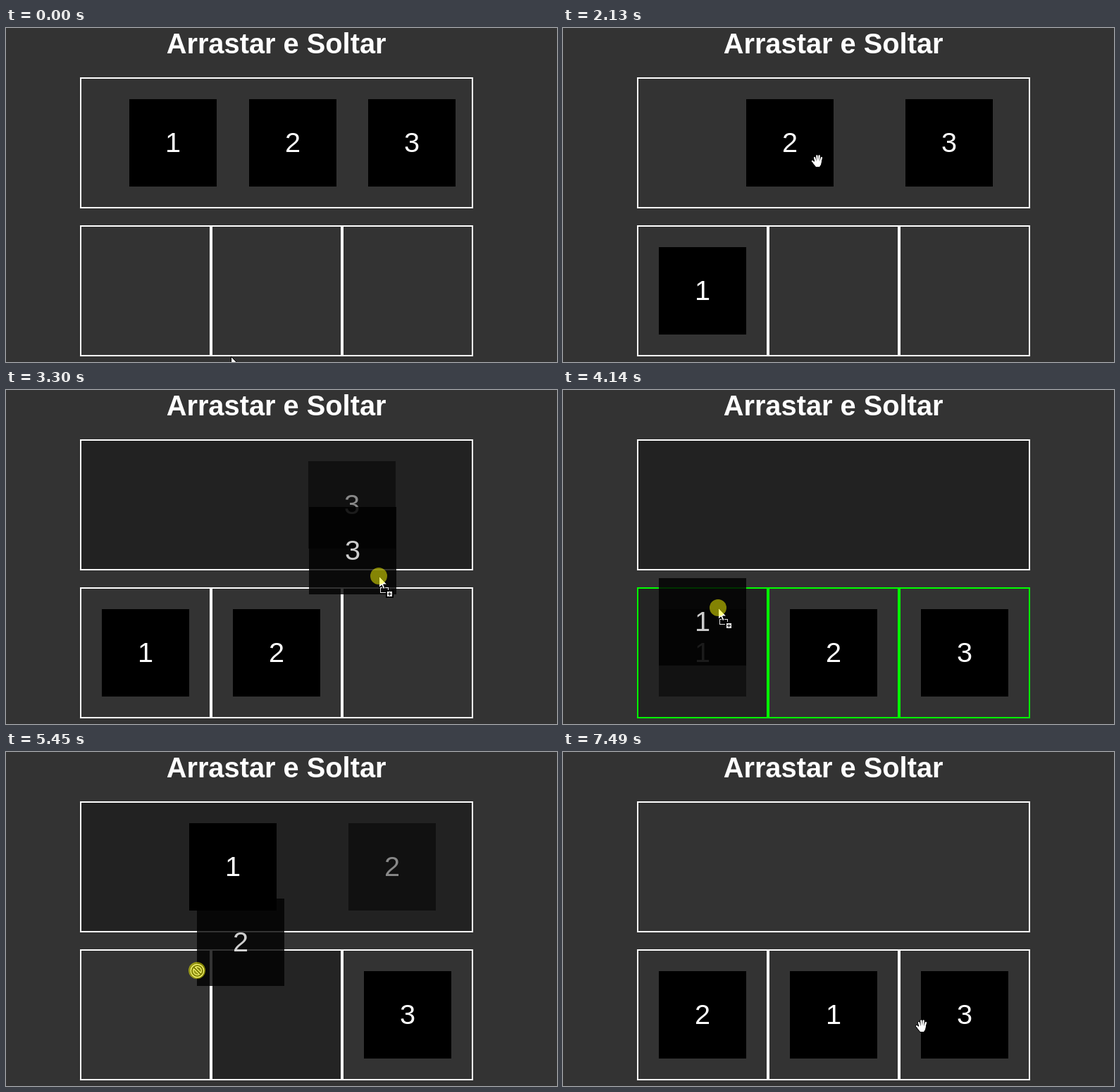
These frames come from a looping animation (782x474 px, 7820 ms). An HTML page with a canvas:

```html
<!DOCTYPE html>
<html lang="pt">
<head>
<meta charset="utf-8">
<title>Arrastar e Soltar</title>
<style>
  html, body { margin: 0; width: 100%; height: 100%; overflow: hidden; background: #333; }
  canvas { display: block; }
</style>
</head>
<body>
<canvas id="stage" width="782" height="474"></canvas>
<script>
const ctx = document.getElementById('stage').getContext('2d');
const LOOP = 7820, TILE = 124, SLOT = 186, LEFT = 105, INNER = 554;
const HOVER = 130; // pause over a tile before pressing
const LAG = 25;    // delay before the page reacts to the pointer
const FAMILY = '"Liberation Sans", Arial, sans-serif';

const point = (x, y) => ({ x, y });
const stop = (time, x, y) => ({ time, x, y });

// Tile and destination follow from where the pointer presses and releases.
const drags = [
  { press: stop(890, 245, 208), drop: stop(1710, 226, 365) },
  { press: stop(2260, 361, 189), drop: stop(2800, 415, 357) },
  { press: stop(3150, 528, 199), drop: stop(3500, 531, 362) },
  { press: stop(4030, 220, 353), drop: stop(4380, 220, 170) },
  { press: stop(4680, 385, 362), drop: stop(4930, 440, 190) },
  { press: stop(5114, 486, 203), drop: stop(5614, 200, 346) },
  { press: stop(6070, 444, 174), drop: stop(6535, 382, 378) }
];

const stops = [
  stop(0, 319, 466), stop(330, 482, 385),
  ...drags.flatMap(({ press, drop }) => [{ ...press, time: press.time - HOVER }, press, drop]),
  stop(6610, 462, 382), stop(6950, 566, 438), stop(7490, 509, 389), stop(LOOP, 509, 389)
];

function pointerAt(t) {
  const i = Math.max(1, stops.findIndex(s => s.time >= t));
  const a = stops[i - 1], b = stops[i];
  const k = (t - a.time) / (b.time - a.time), eased = k * k * (3 - 2 * k);
  return point(Math.round(a.x + (b.x - a.x) * eased), Math.round(a.y + (b.y - a.y) * eased));
}

// -1 is the upper box, 0 to 2 the slots, null outside
function zoneAt({ x, y }) {
  const offset = x - LEFT, inner = offset % SLOT;
  if (offset < 2 || offset > INNER + 2) return null;
  if (y > 71 && y < 254) return -1;
  return y > 281 && y < 464 && inner > 1 && inner < SLOT - 2 ? Math.floor(offset / SLOT) : null;
}

function layout(top, slots) {
  const spots = {}, gap = (INNER - TILE * top.length) / (top.length + 1);
  top.forEach((n, i) =>
    spots[n] = point(Math.round(LEFT + 1.9 + gap * 1.5 + i * (TILE + gap)), 101));
  slots.forEach((n, i) => { if (n) spots[n] = point(136 + SLOT * i, 311); });
  return { top, slots, spots, solved: slots.join() === '1,2,3' };
}

const within = (p, s) => p.x >= s.x && p.x < s.x + TILE && p.y >= s.y && p.y < s.y + TILE;
const tileUnder = (p, spots) => Object.keys(spots).find(n => within(p, spots[n]));

const layouts = [layout([1, 2, 3], [0, 0, 0])];
drags.forEach((drag, i) => {
  const { top, slots, spots } = layouts[i];
  const zone = zoneAt(drag.drop);
  drag.tile = Number(tileUnder(drag.press, spots));
  const newTop = top.filter(n => n !== drag.tile);
  const newSlots = slots.map(n => n === drag.tile ? 0 : n);
  if (zone < 0) newTop.push(drag.tile); else newSlots[zone] = drag.tile;
  layouts.push(layout(newTop, newSlots));
});

function visitedZones(drag, t) {
  const zones = new Set([-1]);
  for (let s = drag.press.time; s <= t - LAG; s += 10) zones.add(zoneAt(pointerAt(s)));
  return zones;
}

function rect(color, x, y, w, h) {
  ctx.fillStyle = color;
  ctx.fillRect(x, y, w, h);
}

function line(shape, color, width) {
  ctx.strokeStyle = color;
  ctx.lineWidth = width;
  ctx.stroke(shape);
}

function box(x, y, w, h, border, fill) {
  rect(border, x, y, w, h);
  rect(fill, x + 2, y + 2, w - 4, h - 4);
}

function drawTile(n, { x, y }, alpha = 1) {
  ctx.globalAlpha = alpha;
  rect('#000', x, y, TILE, TILE);
  ctx.fillStyle = '#fff';
  ctx.font = '39.68px ' + FAMILY;
  ctx.fillText(n, x + TILE / 2, y + 75);
  ctx.globalAlpha = 1;
}

const arrowShape = new Path2D('M.5.5V16.5L4.2 13L6.6 18.5L9 17.5L6.6 12H11.5Z');
const noEntry = new Path2D('M8 .5A7.5 7.5 0 1 1-7 .5A7.5 7.5 0 1 1 8 .5M-4.5-4.5L5.5 5.5');
const palm = new Path2D('M-4 0H6L5 5L3 8H-2L-6 3Z');
const fingers = new Path2D('M-7 0L-3 4');
for (let i = -1.5; i < 2; i++) {
  fingers.moveTo(1 + i * 3.3, -8 + i * i * 1.4);
  fingers.lineTo(1 + i * 2, 2);
}

function arrow() {
  ctx.fillStyle = '#fff';
  ctx.fill(arrowShape);
  line(arrowShape, '#000', 1);
}

function hand() {
  line(palm, '#000', 2);
  line(fingers, '#000', 4);
  line(fingers, '#fff', 2.3);
  ctx.fillStyle = '#fff';
  ctx.fill(palm);
}

function copyArrow() {
  ctx.strokeStyle = '#fff';
  ctx.lineWidth = 1;
  ctx.setLineDash([1, 1]);
  ctx.strokeRect(2.5, 16.5, 11, 7);
  ctx.setLineDash([]);
  arrow();
  box(10, 20, 11, 11, '#000', '#fff');
  rect('#000', 13, 25, 5, 1);
  rect('#000', 15, 23, 1, 5);
}

function forbidden() {
  line(noEntry, '#fff', 4.5);
  line(noEntry, '#000', 2.2);
}

function drawPointer(p, drag, t, spots) {
  ctx.save();
  ctx.translate(p.x, p.y);
  ctx.lineCap = ctx.lineJoin = 'round';
  if (!drag) {
    (tileUnder(p, spots) ? hand : arrow)();
  } else {
    (zoneAt(pointerAt(t - LAG)) === null ? forbidden : copyArrow)();
    ctx.fillStyle = 'rgba(255, 255, 0, .5)';
    ctx.beginPath();
    ctx.arc(0, 0, 12, 0, Math.PI * 2);
    ctx.fill();
  }
  ctx.restore();
}

function draw(t) {
  const { spots, solved } = layouts[drags.filter(d => d.drop.time <= t).length];
  const drag = drags.find(d => t >= d.press.time && t < d.drop.time);
  const lit = drag ? visitedZones(drag, t) : new Set();
  const p = pointerAt(t);

  rect('#333', 0, 0, 782, 474);
  ctx.textAlign = 'center';
  ctx.fillStyle = '#fff';
  ctx.font = 'bold 39.8px ' + FAMILY;
  ctx.fillText('Arrastar e Soltar', 383.6, 36);

  box(LEFT, 70, INNER + 4, SLOT, '#fff', lit.has(-1) ? '#222' : '#333');
  for (let i = 0; i < 3; i++)
    box(LEFT + SLOT * i, 280, SLOT, SLOT, solved ? '#0f0' : '#fff', lit.has(i) ? '#242424' : '#333');

  for (const n in spots) drawTile(n, spots[n], drag && drag.tile == n ? 0.5 : 1);
  if (drag) {
    const home = spots[drag.tile];
    drawTile(drag.tile, point(home.x + p.x - drag.press.x, home.y + p.y - drag.press.y), 0.8);
  }
  drawPointer(p, drag, t, spots);
}

const start = performance.now();
function frame() {
  draw((performance.now() - start) % LOOP);
  requestAnimationFrame(frame);
}
frame();
</script>
</body>
</html>
```
